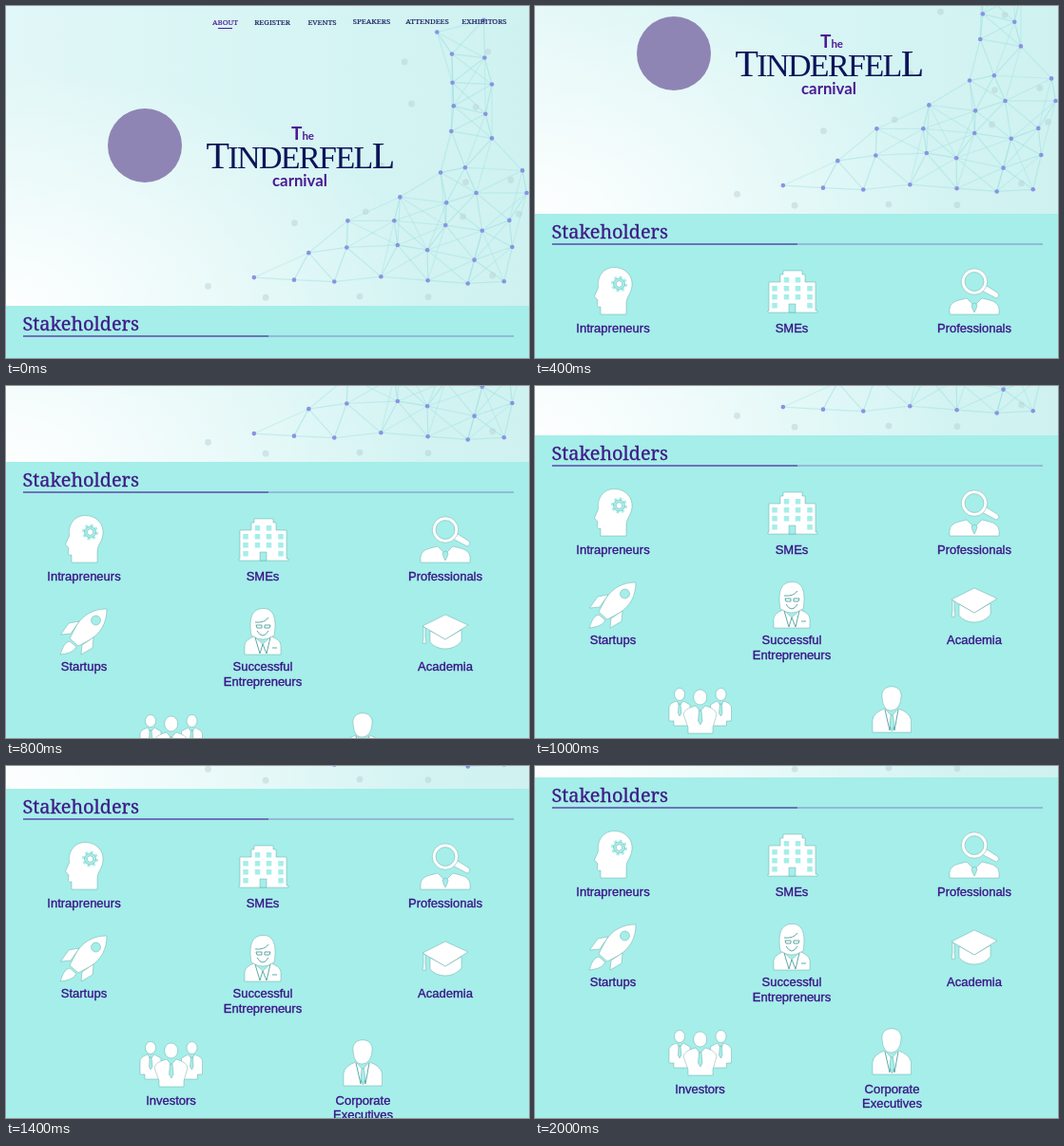
Recreate the animation shown at these times as an HTML page. Size 550 by 371 pixels, loop 2.3 s.

```html
<!DOCTYPE html>
<html lang="en">
<head>
<meta charset="utf-8">
<title>Stakeholders</title>
<style>
  html, body { margin: 0; width: 100%; height: 100%; overflow: hidden; background: #a5eee9; }
  svg { display: block; width: 550px; height: 371px; }
  .nav { font: 500 7.9px "Noto Serif", serif; fill: #151a5c; stroke: #151a5c; stroke-width: .15; text-anchor: middle; }
  .nav .on { fill: #4b1a92; stroke: #4b1a92; }
  .word { font-family: "Liberation Serif", serif; fill: #0c1458; letter-spacing: -1.6px; text-anchor: middle; }
  .small { font-family: Lato, sans-serif; font-weight: 700; fill: #4b1a92; text-anchor: middle; }
  .title { font: 500 19.9px "Noto Serif", serif; fill: #3f1a87; stroke: #3f1a87; stroke-width: .3; }
  .labels { font: 13px "Liberation Sans", Arial, sans-serif; fill: #3a1488; stroke: #3a1488; stroke-width: .35; text-anchor: middle; }
  .icons { fill: #fff; stroke: #4f9a98; stroke-width: .4; stroke-linejoin: round; }
  .cut { fill: #a5eee9; }
  .line { fill: none; stroke: #5fa9a6; stroke-width: 1; }
  .gaps { fill: none; stroke: #a5eee9; }
  .links { stroke: #9fdfe0; stroke-width: 1.3; }
  .faint { fill: #b9d2d6; opacity: .5; }
  .dots { fill: #8a93e2; }
</style>
</head>
<body>
<svg viewBox="0 0 550 371">
  <defs>
    <linearGradient id="sky">
      <stop offset="0" stop-color="#e2f7f7"/>
      <stop offset=".5" stop-color="#d7f5f4"/>
      <stop offset="1" stop-color="#cff2f1"/>
    </linearGradient>
    <radialGradient id="mist" cx="0" cy="1" r=".8">
      <stop offset="0" stop-color="#fff" stop-opacity=".95"/>
      <stop offset=".45" stop-color="#fff" stop-opacity=".5"/>
      <stop offset="1" stop-color="#fff" stop-opacity="0"/>
    </radialGradient>
  </defs>

  <g id="page">
    <rect width="550" height="317" fill="url(#sky)"/>
    <rect width="550" height="317" fill="url(#mist)"/>
    <g id="links" class="links"></g>
    <g id="faint" class="faint"></g>
    <g id="dots" class="dots"></g>

    <g class="nav">
      <text class="on" x="230.5" y="19.5">ABOUT</text>
      <text x="280" y="19.5">REGISTER</text>
      <text x="332.5" y="19.5">EVENTS</text>
      <text x="384.5" y="18.7">SPEAKERS</text>
      <text x="443" y="18.7">ATTENDEES</text>
      <text x="503" y="18.7">EXHIBITORS</text>
      <path d="M223 23.500H238" stroke="#4b1a92" stroke-width="1"/>
    </g>

    <circle cx="146" cy="147" r="39" fill="#8f85b5"/>
    <text class="small" x="312" y="141" font-size="19">T<tspan font-size="11.500">he</tspan></text>
    <text class="word" x="309" y="171" font-size="34"><tspan font-size="40">T</tspan>INDERFEL<tspan font-size="40">L</tspan></text>
    <text class="small" x="309" y="190" font-size="16.800">carnival</text>

    <g transform="translate(0 304)">
      <rect y="12" width="550" height="380" fill="#a5eee9"/>
      <text class="title" x="17.500" y="38">Stakeholders</text>
      <path d="M18 44H534" stroke="#8fa9d4" stroke-width="1.500"/>
      <path d="M18 44H276" stroke="#6259b0" stroke-width="1.700"/>

      <g class="icons">
        <!-- head with gear -->
        <path d="M69 118V110Q64 112 66 103L62.500 99 66.500 90C65 77 73 68 84 68.500C96 69 103 78 102 88C101 97 96 99 96 107V118Z"/>
        <circle class="gaps" cx="88.500" cy="86" r="7" stroke-width="3" stroke-dasharray="2.750"/>
        <circle class="cut" cx="88.500" cy="86" r="6"/>
        <circle cx="88.500" cy="86" r="3.200"/>

        <!-- building with rows of windows -->
        <path d="M246 114V84H258V76H261V72H281V76H284V84H295V114H297V116H245V114Z"/>
        <path class="gaps" stroke-width="5.500" stroke-dasharray="5.500 3.500" d="M252 88V112M264.500 79V104M276.500 79V104M289 88V112"/>
        <path class="cut" d="M267 107H274V116H267Z"/>

        <!-- magnifier over shoulders -->
        <path d="M436 118V112Q437 105 446 103L454 101 462 109 470 101 478 103Q487 105 488 112V118Z"/>
        <path class="cut" d="M459 108 462 106 465 108 464 112 462 116 460 112Z"/>
        <path d="M470 93 475 88 486 95Q490 99 485 101Z"/>
        <circle cx="462" cy="83.500" r="13.700"/>
        <circle class="cut" cx="462" cy="83.500" r="10"/>

        <!-- rocket -->
        <path d="M106 167C92 167 82 173 75 183L67 198 76 206 89 199C100 192 106 181 106 167Z"/>
        <path d="M77 180 66 182 57.500 194 68 193Z"/>
        <path d="M92 197 91 208 79 215 80 205Z"/>
        <path d="M67 201C60 203 59 211 57 215C64 214 70 213 74 207Z"/>
        <circle class="cut" cx="94.500" cy="179" r="5"/>

        <!-- person with glasses -->
        <path d="M258 195C255 176 259 167 270 166.500S285 176 282 195Q276 199 270 199T258 195Z"/>
        <path d="M251 215V205Q252 199 261 196L270 204 279 196Q288 199 289 205V215Z"/>
        <path class="line" d="M262 181Q272 182 276 176M263 184H269V187H264ZM272 184H278L277 187H272ZM264 190Q270 200 276 190M262 197 267 214 270 204 274 214 278 197M280 208H285"/>

        <!-- graduation cap -->
        <path d="M446 190 462 199 479 189V201Q472 209 462 209T446 202Z"/>
        <path d="M438 185 462 173 486 184 462 199Z"/>
        <path d="M439 186 441 187V197L442 203H438L439 197Z"/>

        <!-- group of three -->
        <g id="side">
          <ellipse cx="152" cy="285" rx="5.500" ry="6.500"/>
          <path d="M141 313V298Q142 294 149 292L152 297 156 292 163 296V318H146V313Z"/>
          <path class="cut" d="M151 295H153L154 305 152 308 150.500 305Z"/>
        </g>
        <use href="#side" transform="matrix(-1 0 0 1 347.500 0)"/>
        <ellipse cx="173.700" cy="288" rx="7" ry="8"/>
        <path d="M156 306Q157 300 169 297L173.700 303 179 297Q190 300 191 306L187 320V326H161V320Z"/>
        <path class="cut" d="M172.500 302H175L176 313 174 317 171.500 313Z"/>

        <!-- suited person -->
        <path d="M365 288C363 273 387 273 385 288Q384 301 375 302T365 288Z"/>
        <path d="M355 325V312Q356 304 368 300L375 308 382 300Q394 304 395.500 312V325Z"/>
        <path class="line" d="M368 301 373 323 375 308 378 323 382 301"/>
        <path class="cut" d="M374 307H376.500L378 318 375.500 324 373 318Z"/>
      </g>

      <g class="labels">
        <text x="82" y="136.700">Intrapreneurs</text>
        <text x="270" y="136.700">SMEs</text>
        <text x="462" y="136.700">Professionals</text>
        <text x="82" y="232.300">Startups</text>
        <text x="270" y="232.300">Successful</text>
        <text x="270" y="247.700">Entrepreneurs</text>
        <text x="462" y="232.300">Academia</text>
        <text x="173.500" y="344.500">Investors</text>
        <text x="375.500" y="344.500">Corporate</text>
        <text x="375.500" y="359.800">Executives</text>
      </g>
    </g>
  </g>
</svg>
<script>
  const byId = id => document.getElementById(id);

  function add(parent, tag, attrs) {
    const el = document.createElementNS('http://www.w3.org/2000/svg', tag);
    for (const key in attrs) el.setAttribute(key, attrs[key]);
    byId(parent).append(el);
  }

  let seed = 7;
  const random = () => (seed = seed * 16807 % 2147483647) / 2147483647;
  const jitter = size => (random() - .5) * size;

  // The network hugs the right side and widens towards the bottom.
  const edge = y => 464 - 220 * (Math.max(0, y - 150) / 150) ** 1.3;

  function scatter(top, rowGap, colGap, shift) {
    const points = [];
    for (let y = top; y < 312; y += rowGap) {
      for (let x = edge(y) - shift; x < 550; x += colGap) {
        points.push([x + jitter(colGap * .5), y + jitter(rowGap * .6)]);
      }
    }
    return points;
  }

  const dots = scatter(20, 30, 43, 0);
  dots.forEach(([x, y], i) => {
    add('dots', 'circle', { cx: x, cy: y, r: 2.3 });
    for (const [u, v] of dots.slice(i + 1)) {
      const far = Math.hypot(x - u, y - v);
      if (far < 64) add('links', 'path', { d: `M${x} ${y}L${u} ${v}`, opacity: .8 - far / 130 });
    }
  });
  for (const [x, y] of scatter(52, 60, 72, 45)) add('faint', 'circle', { cx: x, cy: y, r: 3.4 });

  // The scroll speeds up to the turn, then dies away to its end.
  const turn = 6, end = 20, turnY = 190, endY = 304;
  const decay = k => Math.exp(-k / 4);

  function scrollAt(step) {
    if (step < turn) return turnY * (step / turn) ** 1.66;
    const rest = decay(end - turn);
    const left = (decay(Math.min(step, end) - turn) - rest) / (1 - rest);
    return endY - (endY - turnY) * left;
  }

  function draw() {
    const step = Math.floor(performance.now() % 2300 / 100);
    byId('page').setAttribute('transform', `translate(0 ${-Math.round(scrollAt(step))})`);
    requestAnimationFrame(draw);
  }
  draw();
</script>
</body>
</html>
```
